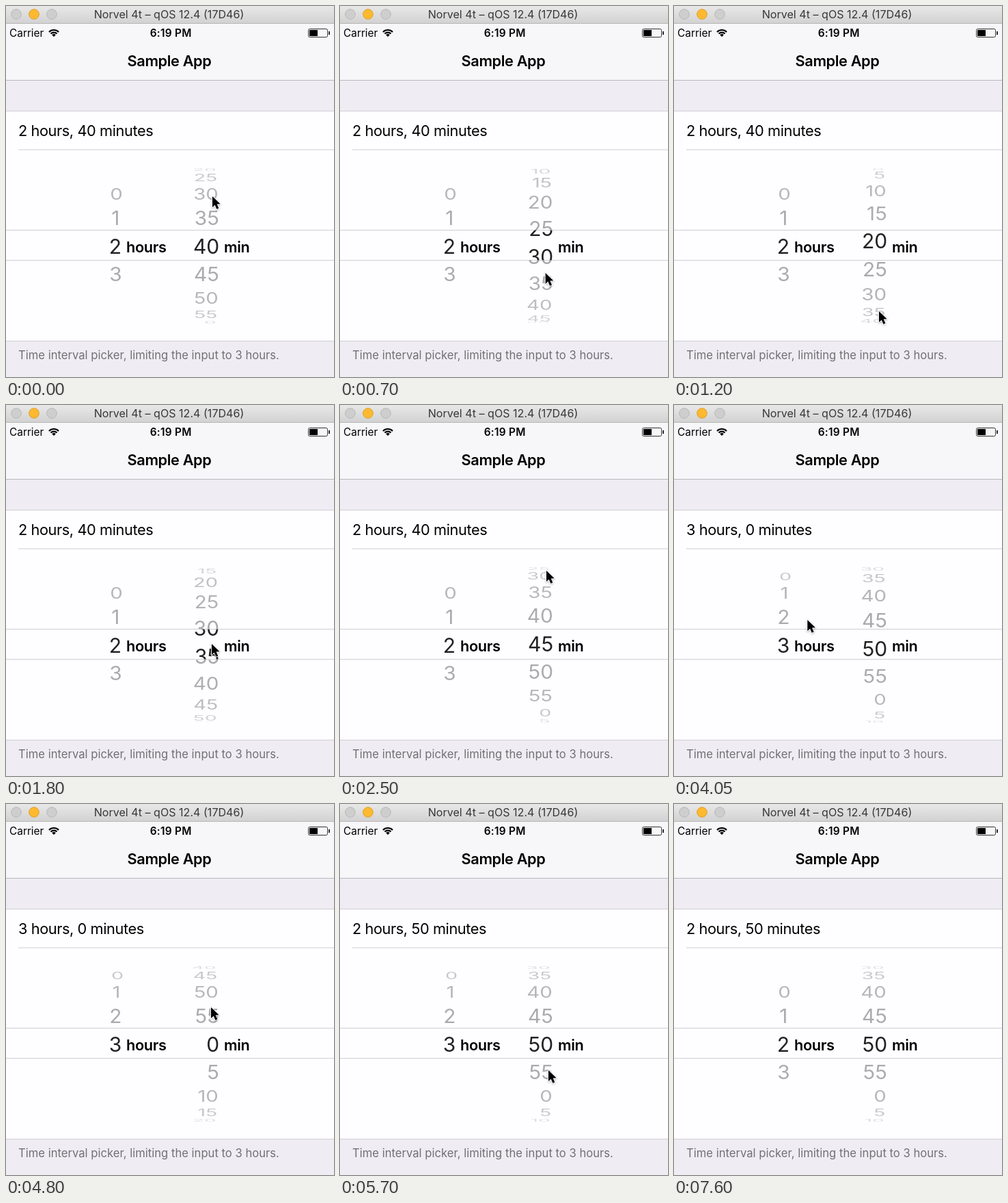
An HTML page with a canvas that plays this animation: 480x542 px, repeating every 7.65 s.

```html
<!DOCTYPE html>
<html lang="en">
<head>
<meta charset="utf-8">
<title>Time interval picker</title>
<style>
html, body { margin: 0; width: 100%; height: 100%; overflow: hidden; background: #efeef3; }
canvas { display: block; width: 480px; height: 542px; }
</style>
</head>
<body>
<canvas id="stage"></canvas>
<script>
const W = 480, H = 542, LOOP = 7650, STEP = 50;
const FONT = 'Inter, "Open Sans", sans-serif';
const canvas = document.getElementById('stage');
const ctx = canvas.getContext('2d');
const ratio = window.devicePixelRatio || 1;
canvas.width = W * ratio;
canvas.height = H * ratio;

// Wheel geometry: a cylinder seen in slight perspective
const MID = 350.6, RADIUS = 121, ROW = 19.8 * Math.PI / 180, DEPTH = 1440;
const BAND = [328, 371], WHEEL = [235, 468];

// Tracks: [time, value, ...], eased between keys
const minutes = [
  [150, 8], [1100, 4.17], [1330, 4.17], [2280, 9.1], [2700, 9],
  [3850, 9], [4400, 12], [4880, 12], [5400, 10.06], [5600, 10]
];
const hours = [[3270, 2], [3640, 2.95], [3800, 3], [5700, 3], [6150, 2]];
const pointer = [
  [80, 302, 277], [1100, 300, 445], [1330, 300, 445], [2300, 302, 241],
  [2680, 302, 241], [3180, 170, 374], [3240, 170, 374], [3630, 171, 317],
  [3850, 171, 317], [4550, 300, 296], [4800, 300, 296], [5400, 305, 388],
  [5800, 305, 388], [6150, 309, 383], [6400, 310, 362], [7100, 361, -28]
];
const labels = [
  [0, '2 hours, 40 minutes'], [2750, '2 hours, 45 minutes'],
  [3850, '3 hours, 0 minutes'], [5650, '2 hours, 50 minutes']
];

function sample(track, t) {
  if (t <= track[0][0]) return track[0].slice(1);
  for (let i = 1; i < track.length; i++) {
    const a = track[i - 1], b = track[i];
    if (t > b[0]) continue;
    const k = (1 - Math.cos(Math.PI * (t - a[0]) / (b[0] - a[0]))) / 2;
    return a.slice(1).map((v, j) => v + (b[j + 1] - v) * k);
  }
  return track[track.length - 1].slice(1);
}

function text(str, x, y, size, opt = {}) {
  ctx.font = `${opt.weight || 400} ${size}px ${FONT}`;
  ctx.letterSpacing = (opt.space || 0) + 'px';
  ctx.textAlign = opt.align || 'left';
  ctx.fillStyle = opt.color || '#000';
  ctx.fillText(str, x, y);
}

function rect(x, y, w, h, color) {
  ctx.fillStyle = color;
  ctx.fillRect(x, y, w, h);
}

function dot(x, fill, edge) {
  ctx.beginPath();
  ctx.arc(x, 12, 7.3, 0, 2 * Math.PI);
  ctx.fillStyle = fill;
  ctx.fill();
  ctx.strokeStyle = edge;
  ctx.lineWidth = 1;
  ctx.stroke();
}

function titleBar() {
  const g = ctx.createLinearGradient(0, 0, 0, 25);
  g.addColorStop(0, '#e8e8e8');
  g.addColorStop(1, '#d2d2d2');
  rect(0, 0, W, 25, g);
  rect(0, 25, W, 1, '#b8b8b8');
  dot(15, '#cfcecf', '#b9b8b9');
  dot(41, '#fdb92f', '#dfa02c');
  dot(67, '#cfcecf', '#b9b8b9');
  text('Norvel 4t – qOS 12.4 (17D46)', 238.5, 18, 16.1, { align: 'center', color: '#383838' });
}

function wifi(x, y) {
  const from = -Math.PI * 0.75, to = -Math.PI * 0.25;
  ctx.fillStyle = ctx.strokeStyle = '#000';
  ctx.lineWidth = 2.1;
  ctx.beginPath();
  ctx.moveTo(x, y);
  ctx.arc(x, y, 3.9, from, to);
  ctx.fill();
  for (const r of [6.4, 10]) {
    ctx.beginPath();
    ctx.arc(x, y, r, from, to);
    ctx.stroke();
  }
}

function battery() {
  ctx.strokeStyle = '#333';
  ctx.lineWidth = 1;
  ctx.beginPath();
  ctx.roundRect(442.5, 33.5, 28, 12, 2);
  ctx.stroke();
  rect(444, 35, 12, 9, '#000');
  rect(472, 37, 2, 5, '#333');
}

function navBar() {
  rect(0, 26, W, 82, '#f7f6f8');
  rect(0, 108, W, 1, '#b9b8bc');
  text('Carrier', 5, 45, 15.4);
  wifi(70, 45);
  text('6:19 PM', 241.2, 45, 15.4, { weight: 600, align: 'center', space: 0.25 });
  battery();
  text('Sample App', 239, 88, 21.76, { weight: 600, align: 'center', space: -0.4 });
}

function table(label) {
  const line = '#cfced3';
  rect(0, 109, W, 433, '#efedf3');
  rect(0, 153, W, 337, line);
  rect(0, 154, W, 335, '#fefdff');
  rect(18, 209.5, W - 18, 1, line);
  rect(0, 327, W, 1, line);
  rect(0, 371, W, 1, line);
  text(label, 18, 189.5, 21.76, { space: -0.42 });
  text('Time interval picker, limiting the input to 3 hours.', 18, 516, 16.64,
    { color: '#707075' });
}

function rows(x, pos, name, align, shade) {
  for (let i = Math.floor(pos) - 4; i <= Math.ceil(pos) + 4; i++) {
    const angle = (i - pos) * ROW, cos = Math.cos(angle);
    const str = name(i);
    if (str === '' || cos < 0.02) continue;
    const s = DEPTH / (DEPTH + RADIUS * (1 - cos));
    ctx.save();
    ctx.translate(W / 2 + (x - W / 2) * s, MID + RADIUS * Math.sin(angle) * s);
    ctx.scale(s, s * cos);
    text(str, 0, 10.9, 30, { align, color: shade(cos) });
    ctx.restore();
  }
}

function wheel(x, pos, name, align) {
  const faded = c => `rgba(0,0,0,${0.08 + 0.26 * c})`;
  const solid = () => '#222';
  const parts = [[WHEEL[0], BAND[0], faded], [...BAND, solid], [BAND[1], WHEEL[1], faded]];
  for (const [top, bottom, shade] of parts) {
    ctx.save();
    ctx.beginPath();
    ctx.rect(0, top, W, bottom - top);
    ctx.clip();
    rows(x, pos, name, align, shade);
    ctx.restore();
  }
}

function arrow(x, y) {
  ctx.save();
  ctx.translate(x, y + 1);
  ctx.scale(0.87, 0.87);
  ctx.beginPath();
  ctx.moveTo(0, 0);
  ctx.lineTo(0, 18.5);
  ctx.lineTo(4.3, 14.6);
  ctx.lineTo(7.4, 21.6);
  ctx.lineTo(10.8, 20.2);
  ctx.lineTo(7.7, 13.3);
  ctx.lineTo(13.4, 13);
  ctx.closePath();
  ctx.shadowColor = 'rgba(0,0,0,0.3)';
  ctx.shadowBlur = 3 * ratio;
  ctx.shadowOffsetY = ratio;
  ctx.lineJoin = 'round';
  ctx.strokeStyle = '#fff';
  ctx.lineWidth = 2;
  ctx.stroke();
  ctx.shadowColor = 'transparent';
  ctx.fillStyle = '#000';
  ctx.fill();
  ctx.restore();
}

function draw(t) {
  ctx.setTransform(ratio, 0, 0, ratio, 0, 0);
  const label = labels.filter(l => l[0] <= t).pop()[1];
  titleBar();
  navBar();
  table(label);
  wheel(160, sample(hours, t)[0], i => (i >= 0 && i <= 3 ? String(i) : ''), 'center');
  wheel(312.3, sample(minutes, t)[0], i => String(((i % 12) + 12) % 12 * 5), 'right');
  text('hours', 176, 359.5, 21.76, { weight: 600, space: -0.4 });
  text('min', 319, 359.5, 21.76, { weight: 600, space: -0.4 });
  const [x, y] = sample(pointer, t);
  if (y > -26) arrow(x, y);
}

const start = performance.now();
function tick() {
  const t = (performance.now() - start) % LOOP;
  draw(Math.floor(t / STEP) * STEP);
  requestAnimationFrame(tick);
}
tick();
</script>
</body>
</html>
```
